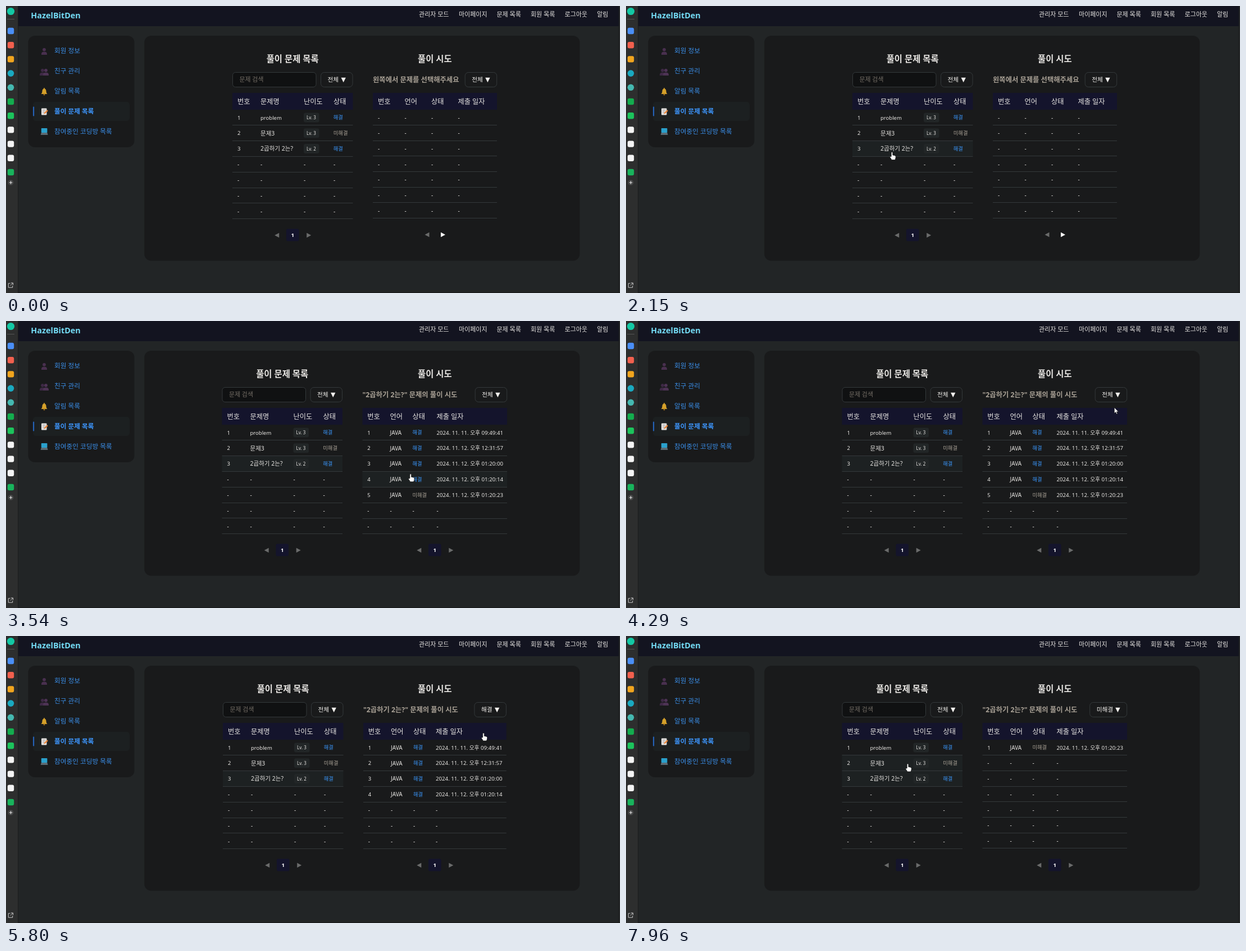
These frames come from a looping animation (1093x512 px, 8000 ms). An HTML page:

```html
<!DOCTYPE html>
<html lang="ko">
<head>
<meta charset="utf-8">
<title>풀이 문제 목록</title>
<style>
html, body { margin: 0; width: 100%; height: 100%; overflow: hidden; background: #222526; }
svg { display: block; }
text { font-family: "Noto Sans", "Noto Sans CJK KR", "Noto Sans CJK JP", "Noto Sans CJK", sans-serif; white-space: pre; }
</style>
</head>
<body>
<svg id="stage" width="1093" height="512" viewBox="0 0 1093 512"></svg>
<script>
const LOOP = 8000;
const INK = '#e8e6e3', MUTED = '#a8a095', BLUE = '#3a96fa', NAVY = '#14142c',
      PANEL = '#191a1b', LINE = '#34393b', HOVER = '#1d2122', GREY = '#6a6b6b';
const TOP = 185, LEFT_STEP = 27.8, LEFT_W = 214.5, MID = 763.3;

// ---- markup helpers ----
const text = (x, cy, s, size, fill = INK, extra = '') =>
  `<text x="${x}" y="${cy + size * .37}" font-size="${size}" fill="${fill}" ${extra}>${s}</text>`;
const rect = (x, y, w, h, fill, r = 0, extra = '') =>
  `<rect x="${x}" y="${y}" width="${w}" height="${h}" rx="${r}" fill="${fill}" ${extra}/>`;
const path = (d, fill, extra = '') => `<path d="${d}" fill="${fill}" ${extra}/>`;
const circle = (x, y, r, fill, extra = '') => `<circle cx="${x}" cy="${y}" r="${r}" fill="${fill}" ${extra}/>`;
const group = (id, body) => `<g id="${id}">${body}</g>`;
const bold = 'font-weight="700"', semi = 'font-weight="600"', middle = 'text-anchor="middle"';
const border = `stroke="${LINE}" stroke-width="1"`;

// Latin words run a little smaller than Hangul ones
const cell = (x, cy, s) => text(x, cy, s, /[가-힣]/.test(s) ? (s.length > 12 ? 9.7 : 10.5) : s === 'JAVA' ? 10 : 9.5);
const status = (x, cy, s) => text(x, cy, s, 9.3, s === '해결' ? BLUE : MUTED);
const arrow = (x, cy, dir, fill) => path(`M${x} ${cy - 4.2}v8.4l${8 * dir}-4.2z`, fill);
const title = (x, s) => text(x, 94, s, 15.4, INK, `${bold} ${middle}`);
const select = (x, w, label) =>
  rect(x, 118.5, w, 26, PANEL, 6, border) +
  text(x + 12, 131.5, label, 10.7, '#f2f0ed', 'font-weight="500"') +
  path(`M${x + w - 20.5} 127.8h8.4l-4.2 8.4z`, '#f2f0ed');
const head = (x, w, cols, names) =>
  rect(x, 155, w, 30, NAVY) + names.map((n, i) => text(cols[i], 170, n, 12.2)).join('');
const lines = (x, w, step) =>
  Array.from({ length: 7 }, (_, i) => rect(x, Math.round(TOP + step * (i + 1) - .5), w, 1, LINE)).join('');
const pager = c =>
  arrow(c - 24, 409, -1, GREY) + rect(c - 11.3, 397.5, 22.6, 22, NAVY, 3) +
  text(c, 408, '1', 9.6, '#fff', `${semi} ${middle}`) + arrow(c + 25, 409, 1, GREY);
const dashes = (cols, cy) => cols.map(x => text(x, cy, '-', 10)).join('');

// ---- data ----
const problems = [['problem', 3, '해결'], ['문제3', 3, '미해결'], ['2곱하기 2는?', 2, '해결']];
const attempts = ['11. 오후 09:49:41', '12. 오후 12:31:57', '12. 오후 01:20:00', '12. 오후 01:20:14', '12. 오후 01:20:23']
  .map((d, i) => ['JAVA', i < 4 ? '해결' : '미해결', '2024. 11. ' + d]);
const filters = ['전체', '해결', '미해결'];
const wide = [643.3, 683.5, 723.5, 766.5];
const scenes = [
  { at: 0, left: 403, x: 653, w: 221, cols: [662, 709.5, 757, 804.5], step: 27.65, pick: 0, btn: 56.5, rows: [] },
  { at: 2780, left: 384.5, x: 634.5, w: 257.5, cols: wide, step: 27.85, pick: 0, btn: 56.5, rows: attempts },
  { at: 5600, left: 386, x: 636, w: 254.7, cols: [644.8, 685, 725, 765], step: 27.8, pick: 1, btn: 56.5, rows: attempts.slice(0, 4) },
  { at: 7070, left: 384.5, x: 634.5, w: 257.5, cols: wide, step: 27.7, pick: 2, btn: 66, rows: attempts.slice(4) }
];

// ---- fixed parts ----
function browserBar() {
  const tiles = ['#4a8ef5', '#f2604e', '#f2a51e', '#1aa9c0', '#45b8b0', '#14ad4e', '#1cc45c', '#f4f4f4', '#f4f4f4', '#f4f4f4', '#19b35c'];
  return rect(0, 0, 21, 512, '#2d2e2e') + rect(21, 0, 1, 512, '#1b1c1c') +
    circle(8.5, 9.5, 6.6, '#14c8a4') + rect(2, 23, 13, 1, '#555') +
    tiles.map((c, i) => i === 3 || i === 4 ? circle(8.5, 44.5 + i * 25.2, 5.8, c)
      : rect(2.8, 38.8 + i * 25.2, 11.4, 11.4, c, 3)).join('') +
    circle(8.5, 315, 5, '#434444') + path('M5.8 315h5.4M8.5 312.3v5.4', 'none', 'stroke="#eee"') +
    path('M7.5 494.8H4.3v7.4h7.4V499M8.8 494h3.7v3.7M12.3 494.2L7.8 498.7', 'none', 'stroke="#ccc"');
}
function topBar() {
  const nav = [[735, '관리자 모드'], [806, '마이페이지'], [873.5, '문제 목록'], [934, '회원 목록'], [994.5, '로그아웃'], [1052, '알림']];
  return rect(22, 0, 1071, 36, '#131420') + text(44.3, 16.5, 'HazelBitDen', 14.4, '#74dcf5', semi) +
    nav.map(([x, s]) => text(x, 15, s, 11)).join('');
}
function person(x, y, fill) {
  return circle(x, y - 3.2, 2.9, fill) + path(`M${x - 5} ${y + 6}q-.4-4.6 3.2-5.2h3.6q3.6.6 3.2 5.2z`, fill);
}
function sideMenu() {
  const items = ['회원 정보', '친구 관리', '알림 목록', '풀이 문제 목록', '참여중인 코딩방 목록'];
  return rect(39.5, 53, 189, 199, PANEL, 12) +
    rect(48, 171, 172, 34, '#1c2021', 5) + rect(48, 179.5, 2.2, 17, '#2462b8', 1) +
    items.map((s, i) => text(86, 80 + i * 35.8, s, 11.7, i === 3 ? '#3d96ff' : '#3a8de6', i === 3 ? bold : '')).join('') +
    person(68, 81, '#49304f') + person(65, 118, '#3e2945') + person(71, 118, '#4d3354') +
    path('M62.5 157q2-1.5 2-5 0-4.4 3.5-4.6 3.5.2 3.5 4.6 0 3.5 2 5z', '#d5a02a') +
    circle(68, 158, 1.5, '#9c6c1c') + circle(68, 147, 1, '#d5a02a') +
    rect(63, 182.5, 9.5, 12, '#e4e2e0', 1) + path('M65 185.5h5.5M65 188h4M65 190.5h3', 'none', 'stroke="#999" stroke-width=".8"') +
    path('M67.5 192.5l.7-2.5 5-4.7 1.7 1.7-4.9 4.8z', '#e8843a') +
    rect(62.8, 218, 10.6, 8, '#2aa0cc', .8) + path('M62.8 226h10.6l1.2 4H61.6z', '#5d6b73');
}

// ---- problem and attempt tables ----
function leftTable() {
  const cols = [9, 50, 127, 180];
  const row = (i) => {
    const cy = TOP + 14 + i * LEFT_STEP, p = problems[i];
    if (!p) return dashes(cols, cy);
    return cell(9, cy, String(i + 1)) + cell(50, cy, p[0]) +
      rect(127, cy - 8.5, 27.5, 17, '#222627', 3) + text(132, cy, 'Lv. ' + p[1], 8) + status(179.8, cy, p[2]);
  };
  return title(107.2, '풀이 문제 목록') +
    rect(.5, 118.5, 148.5, 26, '#101112', 5, border) + text(12.5, 130.5, '문제 검색', 10.9, '#746e66') +
    select(157.5, 56.5, '전체') + head(0, LEFT_W, cols, ['번호', '문제명', '난이도', '상태']) +
    lines(0, LEFT_W, LEFT_STEP) + [0, 1, 2, 3, 4, 5, 6].map(row).join('') + pager(107.2);
}
function rightTable(s) {
  const end = s.x + s.w;
  const row = (i) => {
    const cy = TOP + 14 + i * s.step, r = s.rows[i], c = s.cols;
    if (!r) return dashes(c, cy);
    return cell(c[0], cy, String(i + 1)) + cell(c[1], cy, r[0]) + status(c[2], cy, r[1]) + cell(c[3], cy, r[2]);
  };
  const note = s.rows.length ? '"2곱하기 2는?" 문제의 풀이 시도' : '왼쪽에서 문제를 선택해주세요';
  return title(MID, '풀이 시도') +
    text(s.x, 131.5, note, 12.3, MUTED, bold) + select(end - s.btn - .3, s.btn, filters[s.pick]) +
    head(s.x, s.w, s.cols, ['번호', '언어', '상태', '제출 일자']) + lines(s.x, s.w, s.step) +
    [0, 1, 2, 3, 4, 5, 6].map(row).join('') +
    (s.rows.length ? pager(MID) : arrow(753.5, 408, -1, GREY) + arrow(774, 408, 1, '#fff'));
}
function dropdown(s) {
  const x = s.x + s.w - 86.5;
  return rect(x, 145, 86.2, 64.5, PANEL, 6, border) + rect(x + .5, 146 + s.pick * 21.3, 85.2, 20.8, NAVY, 2) +
    rect(x + .5, 188.6, 85.2, 20.4, HOVER, 4, 'class="last"') +
    filters.map((f, i) => text(x + 12.3, 156 + i * 21.4, f, 10.8)).join('');
}

const outline = 'stroke="#111" stroke-width=".7"';
const hand = path('M-1.3 8V1.3a1.3 1.3 0 0 1 2.6 0V5.4l3.7.8q2 .5 1.8 2.6l-.6 3.1-.9 2.1H-.7Q-1.8 11.300-3.700 9.300q-.3-1.800 2.400-1.300z', '#fff', outline);
const pointer = path('M0 0v10.5l2.4-2.2 1.6 3.6 1.7-.8-1.6-3.4h3.2z', '#fff', outline);

document.getElementById('stage').innerHTML =
  rect(0, 0, 1093, 512, '#222526') + topBar() + browserBar() + sideMenu() +
  rect(246.3, 53, 775, 401.5, PANEL, 12) +
  rect(1090.5, 0, 1, 512, '#151718') + rect(1091.5, 0, 1.5, 512, '#2a2c2d') + rect(22, 510.5, 1071, 1.5, '#1a1c1d') +
  rect(0, 0, 0, 0, HOVER, 0, 'id="picked"') + rect(0, 0, 0, 0, HOVER, 0, 'id="over"') +
  group('left', leftTable()) +
  scenes.map((s, i) => group('right' + i, rightTable(s)) + group('menu' + i, dropdown(s))).join('') +
  circle(0, 0, 7, '#e6dc00', 'id="click" opacity=".66"') + group('hand', hand) + group('arrow', pointer);

// ---- motion ----
const $ = id => document.getElementById(id);
const show = (el, on) => el.setAttribute('display', on ? 'inline' : 'none');
const track = [
  [0, 990, 514], [170, 990, 514], [520, 952, 464], [920, 952, 464], [1740, 475, 267], [2150, 473.5, 260.5],
  [2950, 473.5, 260.5], [3480, 712, 286], [3540, 720, 273], [3900, 800, 219], [4220, 855, 178], [4430, 889, 112],
  [4580, 889, 112], [4760, 882.5, 128], [4990, 882.5, 128], [5310, 850, 173], [5850, 850, 173],
  [6210, 874, 132], [6460, 874, 132], [6900, 854, 196.5], [7200, 854, 196.5], [7960, 501.5, 228], [8000, 501.5, 228]
];
const clicks = [[2630, 2780], [4770, 4900], [5460, 5600], [6340, 6470], [6930, 7070]];
const menus = [[4840, 5600], [6410, 7070]];
const within = (spans, t) => spans.some(([a, b]) => t >= a && t < b);

// Slope at a key; zero where the cursor rests
function slope(i, k) {
  const a = track[i - 1], b = track[i], c = track[i + 1];
  if (!a || !c || a[k] === b[k] || b[k] === c[k]) return 0;
  return (c[k] - a[k]) / (c[0] - a[0]);
}
function cursorAt(t) {
  let i = 0;
  while (i < track.length - 2 && t >= track[i + 1][0]) i++;
  const a = track[i], b = track[i + 1], d = b[0] - a[0], u = (t - a[0]) / d, v = 1 - u;
  return [1, 2].map(k => a[k] * (1 + 2 * u) * v * v + b[k] * (3 - 2 * u) * u * u +
    d * u * v * (slope(i, k) * v - slope(i + 1, k) * u));
}
function place(el, x, w, row, step) {
  show(el, row >= 0);
  if (row < 0) return;
  const box = { x, width: w, y: TOP + row * step, height: step };
  for (const k in box) el.setAttribute(k, box[k]);
}

function draw(t) {
  let n = 0;
  while (n < 3 && t >= scenes[n + 1].at) n++;
  const s = scenes[n], open = within(menus, t), [x, y] = cursorAt(t), end = s.x + s.w;
  $('left').setAttribute('transform', `translate(${s.left})`);
  scenes.forEach((_, i) => { show($('right' + i), i === n); show($('menu' + i), i === n && open); });

  const inMenu = open && x > end - 86.5 && x < end && y > 145 && y < 210;
  const onButton = x > end - s.btn && x < end && y > 118 && y < 145;
  document.querySelectorAll('.last').forEach(el => show(el, inMenu && y > 188));

  const onLeft = x >= s.left && x <= s.left + LEFT_W, onRight = x >= s.x && x <= end;
  const step = onLeft ? LEFT_STEP : s.step;
  const count = onLeft ? problems.length : onRight ? s.rows.length : 0;
  const r = Math.floor((y - TOP) / step), row = !inMenu && r >= 0 && r < count ? r : -1;
  place($('picked'), s.left, LEFT_W, n ? 2 : -1, LEFT_STEP);
  place($('over'), onLeft ? s.left : s.x, onLeft ? LEFT_W : s.w, row, step);

  // The hand stays after a choice until the cursor moves on
  const still = t > 5400 && t < 5900;
  const isHand = inMenu || onButton || row >= 0 || still;
  const at = `translate(${x.toFixed(2)} ${y.toFixed(2)})`;
  for (const id of ['hand', 'arrow', 'click']) $(id).setAttribute('transform', at);
  show($('hand'), isHand);
  show($('arrow'), !isHand);
  show($('click'), within(clicks, t));
}

const start = performance.now();
function tick(now) {
  draw(Math.max(0, now - start) % LOOP);
  requestAnimationFrame(tick);
}
draw(0);
requestAnimationFrame(tick);
</script>
</body>
</html>
```
